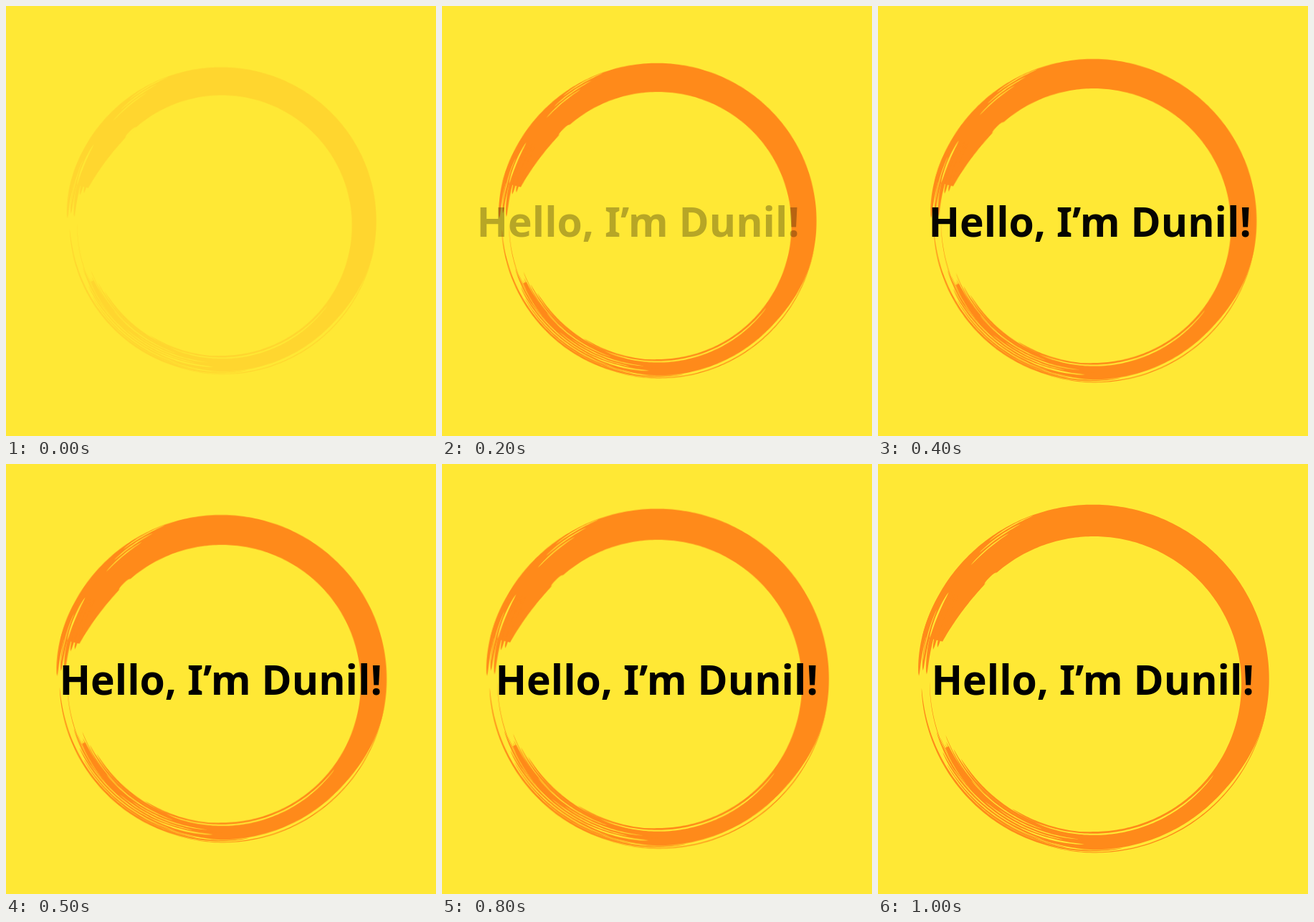
Recreate the animation shown at these times as an HTML page. Size 600 px wide and 600 px high, loop 1.1 s.

```html
<!DOCTYPE html>
<html lang="en">
<head>
<meta charset="utf-8">
<title>Hello</title>
<style>
  html, body { margin: 0; width: 100%; height: 100%; overflow: hidden; background: #ffe835; }
  svg { display: block; width: 100%; height: 100%; }
  #ring {
    transform-origin: 300px 300px;
    animation: grow 1100ms steps(11, jump-none) infinite, appear 1100ms step-end infinite;
  }
  #hello {
    font: 700 57px "Noto Sans", "Open Sans", sans-serif;
    animation: slide 1100ms step-end infinite;
  }
  @keyframes grow { from { transform: scale(.882); } to { transform: scale(1); } }
  @keyframes appear {
    0% { opacity: .19; }
    9.09% { opacity: .62; }
    18.18%, 100% { opacity: 1; }
  }
  @keyframes slide {
    0% { opacity: 0; }
    18.18% { opacity: .28; transform: translateX(-26px); }
    27.27% { opacity: .76; transform: translateX(-13px); }
    36.36% { opacity: .98; transform: translateX(-4px); }
    45.45%, 100% { opacity: 1; transform: none; }
  }
</style>
</head>
<body>
<svg viewBox="0 0 600 600">
  <g id="ring"></g>
  <text id="hello" x="74.5" y="322">Hello, I’m Dunil!</text>
</svg>
<script>
  const ORANGE = '#ff8a1a', YELLOW = '#ffe835';
  const HEAD = 194, TAIL = 515;
  const ring = document.getElementById('ring');

  // Angles are in degrees, clockwise from the right.
  const rad = a => a * Math.PI / 180;
  const clamp = u => Math.min(1, Math.max(0, u));
  const ease = u => clamp(u) ** 2 * (3 - 2 * clamp(u));

  let seed = 7;
  const random = (min, max) => {
    seed = seed * 16807 % 2147483647;
    return min + (max - min) * seed / 2147483647;
  };

  // Radius of the brush's two edges; the tail narrows past the bottom.
  const tail = a => clamp((a - 450) / (TAIL - 450));
  const rim = a => 206 + Math.cos(rad(a)) + 7 * Math.sin(rad(a));
  const inner = a => rim(a) + 16 * clamp((222 - a) / 31) ** 2 + 14 * tail(a);
  const outer = a => 244.5 + 1.2 * Math.cos(rad(2 * a)) - 5 * ease((a - 370) / 35) - 13 * tail(a);

  // Fills the band between two radius functions.
  function band(color, from, to, low, high) {
    const n = Math.ceil(to - from), points = [];
    const add = (k, radius) => {
      const a = from + (to - from) * k / n, r = radius(a);
      points.push((300 + r * Math.cos(rad(a))).toFixed(2) + ',' + (300 + r * Math.sin(rad(a))).toFixed(2));
    };
    for (let k = 0; k <= n; k++) add(k, high);
    for (let k = n; k >= 0; k--) add(k, low);
    const path = document.createElementNS('http://www.w3.org/2000/svg', 'path');
    path.setAttribute('d', 'M' + points.join('L') + 'Z');
    path.setAttribute('fill', color);
    ring.append(path);
  }

  // A bristle mark along a radius function, tapered at both ends.
  function streak(color, from, to, width, radius) {
    const half = a => width / 2 * Math.sqrt(Math.sin(Math.PI * clamp((a - from) / (to - from))));
    band(color, from, to, a => radius(a) - half(a), a => radius(a) + half(a));
  }

  band(ORANGE, HEAD, TAIL, inner, outer);

  // Ragged head: three long outer fingers, two short inner ones.
  for (let i = 0; i < 5; i++) {
    streak(ORANGE, (i < 3 ? 181 : 190) + random(0, 2), 212, 5.4, () => 243 - 5.4 * i);
  }

  // Tail bristles, drifting inwards as they run out.
  for (let i = 0; i < 9; i++) {
    const r = 217 + 2.6 * i;
    streak(ORANGE, random(88, 100), random(142, 163), random(1.2, 3.4), a => r - (a - 90) * .03);
  }
  streak(ORANGE, 80, 177, 2.8, () => 239.5);
  streak(ORANGE, 92, 179, 1, a => 234 - (a - 92) * .07);
  streak(ORANGE, 10, 106, 1.4, a => 245.5 - (a - 10) * .045);
  streak(ORANGE, 80, 122, 2.4, a => rim(a) + 2);

  // Dry gaps in the tail.
  streak(YELLOW, 38.5, 112, 2.3, a => rim(a) + 3.8);
  streak(YELLOW, 93, 116, 2.2, () => 231);
  for (let i = 0; i < 5; i++) {
    const from = random(92, 112);
    streak(YELLOW, from, from + random(25, 45), 1.3, () => 221 + 3.4 * i);
  }

  // Dry gaps in the head, and a nick in its inner edge.
  streak(YELLOW, 194, 211, 2.4, () => 235);
  streak(YELLOW, 186, 204, 1, () => 238.5);
  for (let i = 0; i < 3; i++) {
    streak(YELLOW, 223 + 5 * i, 240 + 5 * i, 1.4, a => 233 + 3.5 * i + (a - 223) * .1);
  }
  streak(YELLOW, 221, 228, 3, a => rim(a) + .5);
</script>
</body>
</html>
```
